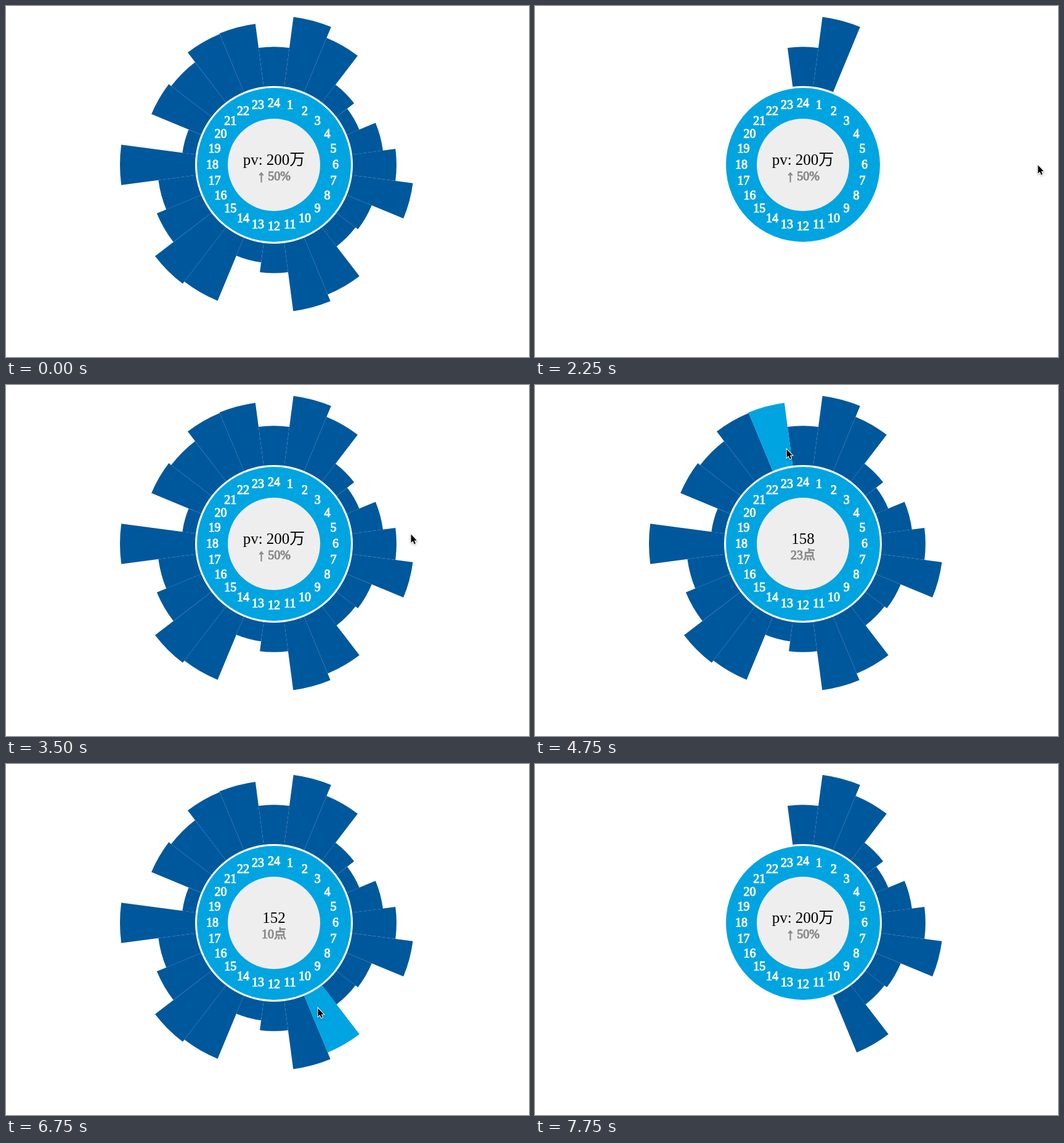
These frames come from a looping animation (849 px wide and 570 px high, 8000 ms). An HTML page with a canvas:

```html
<!DOCTYPE html>
<html lang="zh">
<head>
<meta charset="utf-8">
<title>24h pv</title>
<style>
html, body { margin: 0; width: 100%; height: 100%; overflow: hidden; background: #fff; }
canvas { display: block; }
</style>
</head>
<body>
<canvas id="stage" width="849" height="570"></canvas>
<script>
const ctx = document.getElementById('stage').getContext('2d');
const CX = 435, CY = 258, INNER = 128, OUTER = 250, STEP = 250, LOOP = 8000;
const DARK = '#00589c', LIGHT = '#00a4e0', GREY = '#888', TAU = Math.PI * 2;
const FONT = '"Liberation Serif", "Noto Sans CJK SC", "Noto Sans CJK", serif';

// Page views per hour, starting with hour 24.
const views = [87, 181, 143, 45, 26, 66, 99, 151, 56, 49, 152, 175,
  62, 39, 174, 183, 111, 83, 197, 26, 128, 119, 156, 158];
const max = Math.max(...views);
// The area of a bar is proportional to its value.
const radii = views.map(v => Math.sqrt(INNER ** 2 + (OUTER ** 2 - INNER ** 2) * v / max));

// Pointer path around the centre: step, radius, clockwise degrees from the top.
const path = [
  [0, 600, 90], [2, 500, 90], [3, 401, 91], [5, 120, 81], [7, 500, 91],
  [9, 381, 90], [11, 258, 88.9], [13, 248, 88], [14, 222.6, 85.9],
  [19, 156.4, -9.9], [23, 175, -90], [27, 155.3, -207.2], [28, 155.3, -207.2],
  [29, 360, -263], [30, 600, -263], [32, 600, -263]
];
const arrow = new Path2D('M0 0V13.4L3 10.6L5.3 15.7L7.4 14.8L5.2 9.8H9.3Z');

const rad = deg => deg / 360 * TAU;
const angle = hour => rad(hour * 15 - 90);

function pointerAt(step) {
  const i = path.findIndex(key => key[0] > step);
  const [s0, r0, d0] = path[i - 1], [s1, r1, d1] = path[i];
  const k = (step - s0) / (s1 - s0);
  return { r: r0 + (r1 - r0) * k, deg: d0 + (d1 - d0) * k };
}

function hoveredBar({ r, deg }) {
  const hour = (Math.round(deg / 15) + 24) % 24;
  return r > INNER && r < radii[hour] ? hour : -1;
}

// Five bars appear per step after each reload.
function barCount(step) {
  if (step < 9) return 24;
  return Math.min(24, step < 29 ? 2 + 5 * (step - 9) : 1 + 5 * (step - 29));
}

function disc(r, color) {
  ctx.fillStyle = color;
  ctx.beginPath();
  ctx.arc(CX, CY, r, 0, TAU);
  ctx.fill();
}

function bar(hour, color) {
  const from = angle(hour - 0.5), to = angle(hour + 0.5);
  ctx.fillStyle = color;
  ctx.beginPath();
  ctx.arc(CX, CY, radii[hour], from, to);
  ctx.arc(CX, CY, INNER, to, from, true);
  ctx.fill();
}

function label(text, x, y, size, color, stroke) {
  ctx.font = size + 'px ' + FONT;
  ctx.fillStyle = ctx.strokeStyle = color;
  ctx.fillText(text, x, y);
  if (stroke) {
    ctx.lineWidth = stroke;
    ctx.strokeText(text, x, y);
  }
}

function drawPointer({ r, deg }) {
  ctx.save();
  ctx.translate(CX + r * Math.sin(rad(deg)) + 0.5, CY - r * Math.cos(rad(deg)) + 0.5);
  ctx.shadowColor = 'rgba(0,0,0,.35)';
  ctx.shadowBlur = 3;
  ctx.shadowOffsetY = 1;
  ctx.strokeStyle = '#fff';
  ctx.lineWidth = 2;
  ctx.stroke(arrow);
  ctx.shadowColor = 'transparent';
  ctx.fillStyle = '#000';
  ctx.fill(arrow);
  ctx.restore();
}

function draw(time) {
  const step = Math.floor((time % LOOP) / STEP);
  const pointer = pointerAt(step);
  const hover = hoveredBar(pointer);

  ctx.fillStyle = '#fff';
  ctx.fillRect(0, 0, 849, 570);
  for (let i = 0; i < barCount(step); i++) bar(i, i === hover ? LIGHT : DARK);
  disc(125, LIGHT);
  disc(75, '#eee');

  ctx.textAlign = 'center';
  for (let h = 1; h <= 24; h++) {
    const a = angle(h);
    label(h, CX + 100 * Math.cos(a), CY + 100 * Math.sin(a) + 6, 20, '#fff', 1);
  }
  if (hover >= 0) {
    label(views[hover], CX, 258, 25, '#000');
    label((hover || 24) + '点', CX, 283, 20, GREY, 1);
  } else {
    label('pv: 200万', CX, 258, 25, '#000');
    label('↑', 414.5, 285, 26, GREY, 1);
    label('50%', 443.5, 283, 20, GREY, 1);
  }
  drawPointer(pointer);
}

const start = performance.now();
function tick() {
  draw(performance.now() - start);
  requestAnimationFrame(tick);
}
tick();
</script>
</body>
</html>
```
